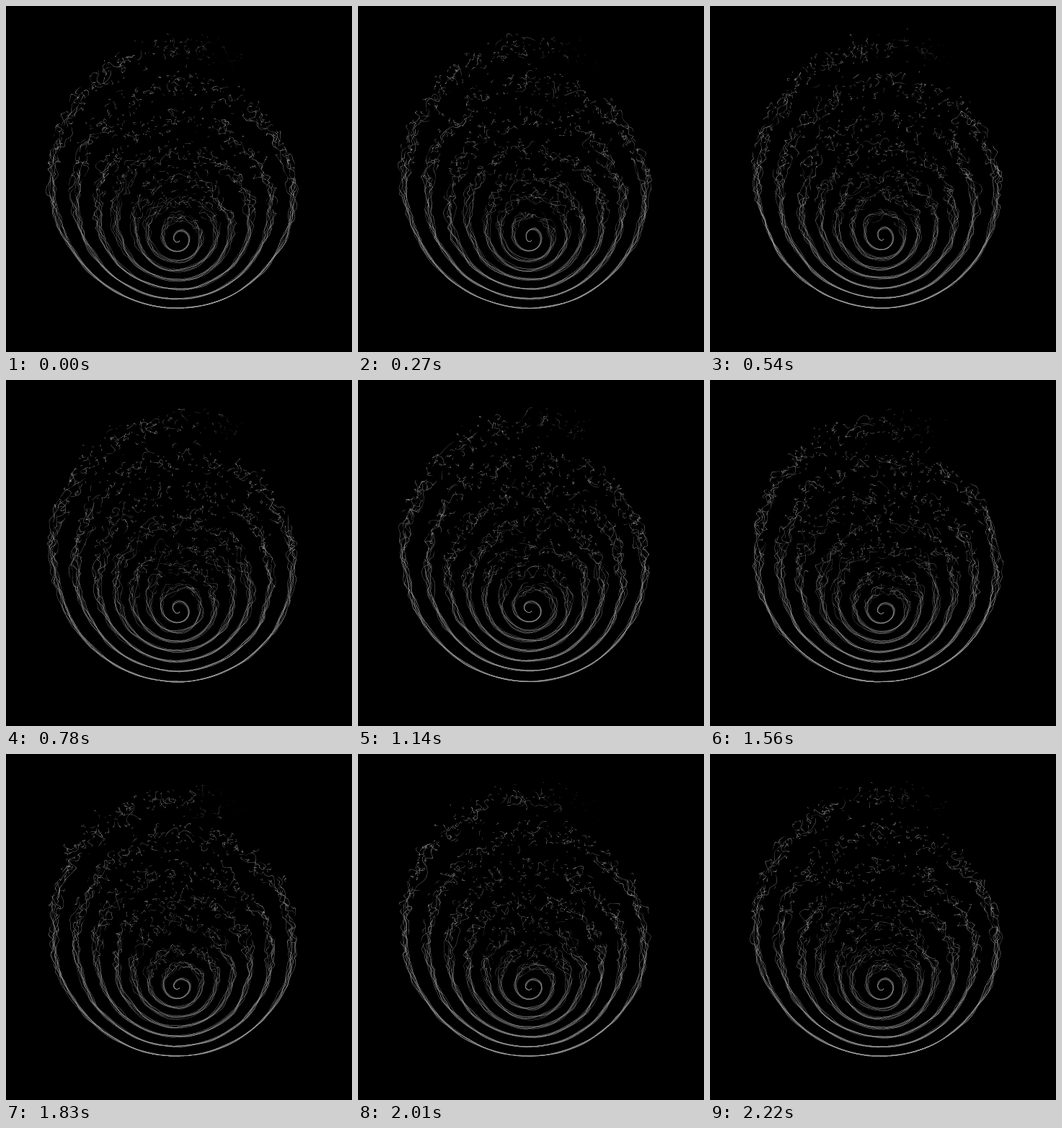
An HTML page with a canvas for the animation above (2.25 s loop, 480 by 480 pixels).

```html
<!DOCTYPE html>
<html lang="en">
<head>
<meta charset="utf-8">
<title>Turbulent spiral</title>
<style>
html, body { margin: 0; width: 100%; height: 100%; overflow: hidden; background: #000; }
canvas { display: block; width: 480px; height: 480px; }
</style>
</head>
<body>
<canvas id="stage" width="480" height="480"></canvas>
<script>
const SIZE = 480, LOOP = 2250, STEP = 30, TAU = Math.PI * 2;
const STRANDS = 8, START = -0.7, END = 14.68;
const ctx = document.getElementById('stage').getContext('2d');
const image = ctx.createImageData(SIZE, SIZE);
const pixels = new Uint32Array(image.data.buffer);
const light = new Float32Array(SIZE * SIZE);

let seed = 20417;
function random() {
  seed = (Math.imul(seed, 1664525) + 1013904223) >>> 0;
  return seed / 4294967296;
}

// Spiral sampled about once per pixel; u counts half turns.
const path = [];
let length = 0;
for (let u = START; u < END;) {
  const r = Math.max(0, 7 + 7.3 * u + 0.335 * u * u);
  const a = Math.PI * (1 + u);
  const h = (1 - Math.sin(a)) / 2;
  const loose = 3.6 * Math.max(0, 1 - r / 150) * Math.min(1, (r / 32) ** 3);
  path.push({
    x: 239 + r * Math.cos(a),
    y: 323 - 0.65 * u - 0.34 * u * u + r * Math.sin(a),
    s: length,
    h,
    bob: Math.max(0, 1 - (r / 180) ** 3),
    amp: 1.2 * Math.min(1, r / 40) + loose + 17 * h ** 1.3 * Math.min(1, r / 120),
    glow: (36 + 34 * r / 170) * Math.min(1, (END - u) / 0.25)
  });
  const ds = Math.min(1, 0.3 + r / 12);
  u += ds / (Math.PI * Math.max(r, 3));
  length += ds;
}

// Smooth noise along the curve whose nodes oscillate periodically.
function makeNoise(wave) {
  const count = Math.ceil(length / wave) + 5;
  const phase = Float32Array.from({ length: count * 2 }, () => random() * TAU);
  const value = new Float32Array(count);
  const shift = random();
  return {
    update(t) {
      for (let i = 0; i < count; i++) {
        value[i] = 0.85 * Math.sin(t + phase[i]) + 0.35 * Math.sin(2 * t + phase[i + count]);
      }
    },
    at(s) {
      const p = s / wave + shift, i = Math.floor(p), f = p - i;
      const a = value[i], b = value[i + 1], c = value[i + 2], d = value[i + 3];
      return b + 0.5 * f * (c - a + f * (2 * a - 5 * b + 4 * c - d + f * (3 * (b - c) + d - a)));
    }
  };
}

const pair = wave => [makeNoise(wave), makeNoise(wave)];
const sway = pair(55);
const strands = Array.from({ length: STRANDS }, () => ({ wide: pair(27), fine: pair(8.5) }));
const noises = sway.concat(...strands.map(k => [...k.wide, ...k.fine]));

function deposit(x, y, amount) {
  const px = Math.round(x), py = Math.round(y);
  if (px >= 0 && py >= 0 && px < SIZE && py < SIZE) light[py * SIZE + px] += amount;
}

// A stretched thread thins out and finally breaks.
function thread(x0, y0, x1, y1, rest, glow) {
  const d = Math.hypot(x1 - x0, y1 - y0);
  const stretch = Math.max(0.6, d / rest);
  const power = glow / stretch * Math.min(1, (1.95 - stretch) / 0.5);
  if (power <= 0) return;
  const n = Math.max(1, Math.ceil(d * 2));
  for (let i = 1; i <= n; i++) {
    deposit(x0 + (x1 - x0) * i / n, y0 + (y1 - y0) * i / n, power * d / n);
  }
}

function draw(ms) {
  const t = ms / LOOP * TAU;
  const lift = 2.6 * (1 - Math.cos(t));
  light.fill(0);
  noises.forEach(n => n.update(t));
  const drift = path.map(p => [
    p.x + 2.6 * p.h * sway[0].at(p.s),
    p.y + 2.6 * p.h * sway[1].at(p.s) - lift * p.bob
  ]);
  for (const { wide, fine } of strands) {
    let lastX, lastY;
    path.forEach((p, i) => {
      const low = 0.65 * p.amp, high = 0.7 * p.amp * p.h;
      const x = drift[i][0] + low * wide[0].at(p.s) + high * fine[0].at(p.s);
      const y = drift[i][1] + low * wide[1].at(p.s) + high * fine[1].at(p.s);
      if (i) thread(lastX, lastY, x, y, p.s - path[i - 1].s, p.glow);
      lastX = x;
      lastY = y;
    });
  }
  for (let i = 0; i < light.length; i++) {
    const v = light[i] > 17 ? Math.round(165 * (1 - Math.exp(-light[i] / 150))) : 0;
    pixels[i] = 0xff000000 | v << 16 | v << 8 | v;
  }
  ctx.putImageData(image, 0, 0);
}

const origin = performance.now();
let shown = -1;
function tick() {
  const elapsed = Math.max(0, performance.now() - origin) % LOOP;
  const ms = Math.floor(elapsed / STEP) * STEP;
  if (ms !== shown) draw(shown = ms);
  requestAnimationFrame(tick);
}
tick();
</script>
</body>
</html>
```
